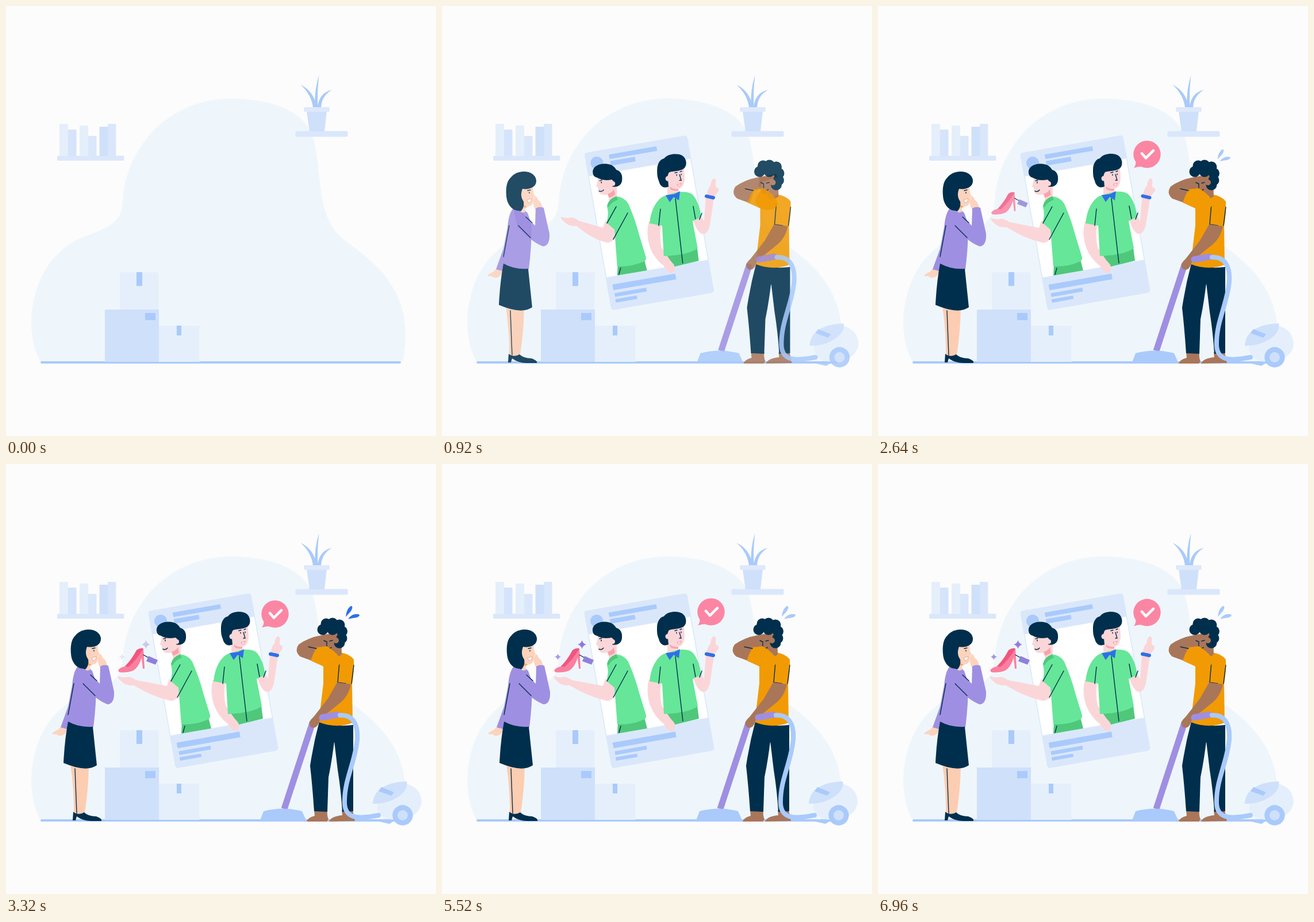
Recreate the animation shown at these times as an HTML page. Size 748 px wide and 748 px high, loop 7000 ms.

```html
<!DOCTYPE html>
<html lang="en">
<head>
<meta charset="utf-8">
<title>Tidy-up scene</title>
<style>
  html, body { margin: 0; width: 100%; height: 100%; overflow: hidden; background: #fcfcfc; }
  svg { display: block; width: 100vw; height: 100vh; }
  .fade > * { opacity: var(--show, 0); }
  .ink { fill: #002f4d; }
  .pink { fill: #fbd6d8; }
  .peach { fill: #fdd3bd; }
  .brown { fill: #a9765a; }
  .green { fill: #66e698; }
  .moss { fill: #4fc87b; }
  .violet { fill: #9f8fe2; }
  .amber { fill: #f19a04; }
  .sky { fill: #a9cafb; }
  .mist { fill: #cfe0fb; }
  .pale { fill: #dae7fb; }
  .haze { fill: #e5effc; }
  .line { fill: none; stroke: #002f4d; stroke-width: 1.4; stroke-linecap: round; }
  .pipe { fill: none; stroke-linecap: round; }
</style>
</head>
<body>
<svg viewBox="0 0 748 748">
  <path fill="#eef6fb" d="M59 618C40 580 41 535 51 500C64 452 95 418 132 403C178 385 201 378 203 340C208 245 283 161 392 161C445 161 520 175 535 232C550 290 540 360 580 400C612 428 695 470 695 572Q695 600 690 618Z"/>

  <g id="books">
    <rect class="pale" x="89" y="260.5" width="116.500" height="8.500" rx="2"/>
    <path class="haze" d="M93 205h15v56h-15zM128 208h15v53h-15z"/>
    <path fill="#d5e4fb" d="M108 215h14.500v46h-14.500z"/>
    <path class="pale" d="M143 226h14.500v35h-14.500zM177 205h14.500v56h-14.500z"/>
    <path class="mist" d="M162.500 210h15v51h-15z"/>
  </g>

  <g id="plant">
    <rect class="pale" x="503.500" y="217.500" width="91" height="10" rx="2"/>
    <path class="sky" d="M534 177Q532 155 512.500 137Q537 149 540 177ZM537.500 177Q536 146 544.500 120Q541 150 542.500 177ZM542 177Q544 151 567 146Q549 156 548 177Z"/>
    <path class="mist" d="M523 183h35l-4 35h-26z"/>
    <rect fill="#dfe9fb" x="518" y="176" width="45" height="8" rx="2"/>
  </g>

  <path class="pipe" stroke="#a9cafb" stroke-width="4" d="M62 620H685"/>
  <g id="boxes">
    <path class="mist" d="M172 528h94v91h-94z"/>
    <path class="haze" d="M198 463h67.500v65h-67.500zM266 556h70.500v63h-70.500z"/>
    <path class="sky" d="M227 463h10v24h-10zM242 534h18v12.500h-18zM297 556h8v17h-8z"/>
  </g>

  <g id="phone">
    <g transform="rotate(-10 360.500 377)">
      <rect class="pale" x="269.500" y="238" width="182" height="278" rx="5"/>
      <path fill="#fff" d="M271 279.500h179v178.500h-179z"/>
      <circle class="sky" cx="288.500" cy="258.700" r="11"/>
      <path class="sky" d="M311.500 248h84v8h-84zM311.500 259.500h44v8h-44zM279 472h111v10h-111zM280 487.500h56v6.500h-56zM279.500 498h38v6h-38z"/>
    </g>

    <g id="presenter">
      <path class="moss" d="M306 449L305 469L357 460L352 441Z"/>
      <path class="pink" d="M271 296L270 307L268 314L271 316Q271 327 278 328Q285 330 290 327L290 338L304 335L304 312L300 296Z"/>
      <path fill="#f9a3aa" d="M288 327Q295 325 299 319L301 328Q296 333 290 333Z"/>
      <path class="ink" d="M262 290C261 279 274 273 288 275C296 276 300 280 303 285C311 287 314 294 313 303C312 312 305 316 296 314Q301 305 295 302Q280 305 270 299Q262 297 262 290Z"/>
      <circle class="pink" cx="297" cy="309" r="4"/>
      <path class="line" d="M277 306v2M274 304l4 -1"/>
      <path class="line" stroke="#e9687a" d="M273 322Q278 324 281 320"/>
      <path id="reach" class="pink"/>
      <path class="green" d="M287 350Q288 337 303 331Q318 333 324 344Q336 371 343 398L355 437Q356 443 350 445Q330 454 305 453L300 389L286 377Q291 362 287 350Z"/>
      <path class="moss" d="M287 348Q289 336 303 331L306 337Q294 341 290 350Z"/>
      <path class="line" d="M303 349L287 378M323 360L298 406M311 456L308 467"/>
    </g>

    <g id="greeter">
      <path class="moss" d="M386 432L390 453L402 454L447 443L444 420Z"/>
      <path class="pink" d="M360 375L381 381Q378 400 382 420L397 442L404 450Q408 462 400 465Q390 462 386 452Q370 440 362 420Q354 396 360 375Z"/>
      <path class="pink" d="M391 286L421 281L422 300Q421 316 411 318L412 326L398 336L392 327Z"/>
      <path fill="#f9a3aa" d="M396 314Q402 319 411 318L411 321Q401 322 397 318Z"/>
      <path class="ink" d="M374 285C374 273 380 266 386 265C392 257 405 256 413 258C425 261 427 275 422 281C416 288 404 286 395 289C392 293 392 298 393 303L394 314C385 318 379 313 377 304C374 297 374 292 374 285Z"/>
      <circle class="pink" cx="393" cy="300" r="4.500"/>
      <path class="line" d="M405 290l4 -1M414 288l3 -1M408 293v1.500M416 292v1.500M413 293l3 10h-3"/>
      <path fill="#fff" stroke="#e9687a" stroke-width=".7" d="M409 310Q413 311 416 308Q416 313 411 313Z"/>
      <g id="wave">
        <path class="pink" d="M437 370L451 366L456 374L459 332L473 334L466 382Q461 399 452 396Q442 391 437 370Z"/>
        <path class="pink" d="M460 330Q462 317 467 312Q468 302 473 299Q478 301 476 310Q475 315 480 316Q483 320 479 324L473 332Z"/>
        <path class="pipe" stroke="#2f6fe8" stroke-width="6" d="M460 330.500L472 333"/>
      </g>
      <path class="green" d="M379 335Q384 330 393 328L412 323Q430 322 436 328Q447 340 451 367L436 374L438 385L445 421Q430 433 386 435L383 382L361 378Q364 349 379 335Z"/>
      <path fill="#2f6fe8" d="M389 329L396 341L403 332L412 338L414 322L404 327Z"/>
      <path class="line" d="M406 335L419 447M380 353L377 382M437 348L441 370M452 360L448 371"/>
    </g>
  </g>

  <g id="bubble">
    <circle fill="#fb86a4" cx="468" cy="257.500" r="23.700"/>
    <path fill="#fb86a4" d="M448 266Q450 275 445 281Q455 278 464 279Z"/>
    <path class="pipe" stroke="#fff" stroke-width="4.500" stroke-linejoin="round" d="M459 256l7 8l13 -13"/>
  </g>

  <g id="shoe">
    <path fill="#fb7f9e" d="M195 359Q198 354 207 352Q219 339 227 324Q233 319 239 321L241 356H238L236 337Q231 353 222 359Q210 364 197 362Z"/>
    <path fill="#f2557f" d="M207 352Q220 339 227 324Q233 319 239 321Q227 341 213 353Z"/>
    <path class="line" d="M239 332L248 337"/>
    <path fill="#8f80da" d="M248 334L264 341L260 349L244 343Z"/>
  </g>
  <path id="sparkBig" fill="#8b79dd"/>
  <path id="sparkSmall" fill="#8b79dd"/>

  <g id="woman" class="fade">
    <g>
      <path class="peach" d="M95 457L106 459Q107 468 98 472Q91 474 88 470L81 470Q79 467 91 462Z"/>
      <path fill="#fdcdb2" d="M112 522L144 527Q143 570 137 606L135 612L118 612Q119 570 112 522Z"/>
      <path class="line" d="M120 530L123 607"/>
      <path class="ink" d="M117 605Q126 612 136 606Q143 613 157 613Q168 617 166 621H148Q134 621 123 613L121 620H116Z"/>
      <path class="violet" d="M124 353Q117 362 115 385L108 422L95 458L106 461L114 436L107 452Q130 461 152 458Q157 420 157 380L150 360Q140 348 124 353Z"/>
      <path class="ink" d="M108 448Q128 459 151 457L158 524Q140 537 100 520Q102 480 108 448Z"/>
      <path class="line" d="M118 382L108 436"/>
      <path class="peach" d="M136 313L159 314L160 325L163 331L160 334Q161 347 151 349L146 348L146 358Q138 362 132 355Z"/>
      <path fill="#f9a673" d="M140 342Q144 348 150 349L146 351Q141 350 139 347Z"/>
      <path class="ink" d="M165 303C164 293 153 287 142 288C131 289 125 293 121 298C113 305 112 318 113 330C114 346 124 357 138 357C143 353 144 345 143 340C138 333 138 326 141 318C151 320 166 316 165 303Z"/>
      <path class="line" d="M150 321l5 -1M153 324v1.500"/>
      <path fill="#fff" stroke="#f08a6a" stroke-width=".7" d="M149 337L157 335Q156 343 151 342Z"/>
    </g>
    <g>
      <g id="hush">
        <path class="peach" d="M164 355Q156 341 163 331Q166 330 168 337Q176 342 176 355Z"/>
        <path class="violet" d="M164 352Q171 348 178 351L188 396Q189 418 176 418Q164 410 163 386Z"/>
      </g>
      <path class="violet" d="M126 356Q138 353 147 366L165 384L180 392Q190 414 177 418Q160 413 132 384Z"/>
      <path class="line" d="M134 382L155 403M147 367L158 377"/>
    </g>
  </g>

  <g id="man" class="fade">
    <g>
      <path class="brown" d="M536 602H559Q558 612 561 618L558 622H523Q525 615 537 612ZM584 602H603L607 621L562 622Q565 613 585 611Z"/>
      <path class="ink" d="M545 448Q572 458 604 454V604L585 605Q583 570 577 532L571 482Q567 516 561 545L559 605L536 604Q533 560 529 525Q535 485 545 448Z"/>
      <path class="line" stroke="#45657c" d="M568 472L571 484"/>
      <path class="amber" d="M558 317Q545 328 543 342L552 352V382L544 449Q575 461 603 450L602 383Q606 360 605 340Q597 330 582 328Q569 338 558 317Z"/>
      <path class="line" d="M580 345L577 380L591 382M605 350L601 382"/>
    </g>
    <path class="brown" d="M534 343L512 335Q501 326 509 314Q526 302 548 298L580 292L582 298L556 306L552 318L541 322Z"/>
    <g>
      <path class="brown" d="M551 297L549 312L552 316Q552 328 564 328L567 335Q577 338 584 331L583 296Z"/>
      <path class="pipe" stroke="#002f4d" stroke-width="19" d="M551 288h0M557 278h0M568 277h0M580 280h0M584.500 291h0M584 303h0M580 311h0M568 288h0"/>
      <circle class="brown" cx="574" cy="307" r="5"/>
      <path class="line" d="M553 307l4 2M563 308l5 -1M558 309v8M557 320Q562 323 566 319"/>
    </g>
    <g>
      <path class="amber" d="M558 317L540 319Q534 330 530 342L552 352Q574 360 582 346Q584 333 558 317Z"/>
      <path class="line" d="M526 318L540 321"/>
    </g>
    <path class="pipe" stroke="#9f8fe2" stroke-width="11" style="stroke-linecap:butt" d="M533.500 449L484 600"/>
    <path class="brown" d="M576 380L600 383Q596 405 578 418L546 444Q542 462 531 458Q523 450 535 440L560 408Z"/>
    <path class="pipe" stroke="#9f8fe2" stroke-width="11" d="M550 441L576 436"/>
    <path class="sky" d="M442 620L448 604Q482 595 515 604L523 622Z"/>
    <path class="haze" d="M645 598Q650 556 695 556Q722 562 723 589Q720 612 690 617Q655 625 645 598Z"/>
    <path class="pipe" stroke="#a9cafb" stroke-width="8" d="M581 437C603 436 613 452 611 480C607 520 588 550 589 590C590 615 608 619 648 611"/>
    <g>
      <path class="mist" d="M638 591Q640 555 697 552Q700 565 685 577Q664 592 638 591Z"/>
      <path class="sky" d="M653 562L675 571L670 577L648 569ZM649 622Q658 614 675 621L667 626Z"/>
      <circle class="sky" cx="690" cy="611" r="17.700"/>
      <circle class="mist" cx="690" cy="611" r="9"/>
    </g>
  </g>

  <path id="sweat" d="M591 266Q592 252 600 247Q605 247 600 256ZM595 269.500Q603 259 614 261.500Q617 264 610 267Z"/>
</svg>
<script>
  const LOOP = 7000, STEP = 40;
  const el = id => document.getElementById(id);
  const clamp = x => Math.max(0, Math.min(1, x));
  const span = (t, from, to) => clamp((t - from) / (to - from));
  const smooth = p => p * p * (3 - 2 * p);
  const mix = (a, b, p) => a + (b - a) * p;
  const cosine = (t, peak, period) => Math.cos(2 * Math.PI * (t - peak) / period);
  const backOut = p => 1 + 2.9 * (p - 1) ** 3 + 1.9 * (p - 1) ** 2;
  const set = (id, name, value) => el(id).setAttribute(name, value);
  const move = (id, value) => set(id, 'transform', value);
  const scaleAt = (x, y, s) => `translate(${x} ${y}) scale(${s}) translate(${-x} ${-y})`;

  function star(x, y, r) {
    const k = r * 0.2;
    return `M${x} ${y - r}Q${x + k} ${y - k} ${x + r} ${y}Q${x + k} ${y + k} ${x} ${y + r}` +
      `Q${x - k} ${y + k} ${x - r} ${y}Q${x - k} ${y - k} ${x} ${y - r}Z`;
  }

  // The open hand slides by d while the elbow stays under the sleeve.
  function reachPath(d) {
    const at = (x, y) => `${x + d} ${y - d * 0.17}`;
    return `M284 374L309 387Q302 411 287 412Q${255 + d / 3} 405 ${at(222, 385)}` +
      `Q${at(207, 386)} ${at(202, 379)}Q${at(193, 372)} ${at(195, 369)}` +
      `Q${at(206, 373)} ${at(213, 370)}Q${at(222, 372)} ${at(226, 376)}L280 386Z`;
  }

  function enter(id, p, distance) {
    el(id).style.setProperty('--show', p);
    move(id, `translate(${distance * (1 - p)} 0)`);
  }

  function draw(t) {
    const left = (1 - span(t, 20, 1020)) ** 3;
    move('phone', `rotate(${180 * left} 340 377.5) ${scaleAt(340, 377.5, 1 - left)}`);

    const shown = span(t, 160, 1040);
    enter('woman', shown, -8);
    enter('man', shown, 11);

    const pull = smooth(span(t, 1360, 2000)), give = smooth(span(t, 2040, 2760));
    set('reach', 'd', reachPath(mix(mix(12, 24, pull), 0, give)));
    move('wave', `rotate(${13 * pull * (1 - give)} 453 364)`);

    const pop = span(t, 1360, 1880);
    const bob = 3.5 * cosine(t, 3320, 3000);
    move('bubble', `translate(0 ${bob}) ${scaleAt(446, 281, pop ? Math.max(0, backOut(pop)) : 0)}`);

    const gift = smooth(span(t, 2320, 2760));
    set('shoe', 'opacity', gift);
    move('shoe', scaleAt(220, 365, mix(0.6, 1, gift)));
    const glow = span(t, 2700, 3200);
    set('sparkBig', 'opacity', glow * clamp(0.7 + 0.35 * cosine(t, 1130, 1500)));
    set('sparkSmall', 'opacity', glow * clamp(0.42 + 0.4 * cosine(t, 870, 1500)));

    const hush = span(t, 2800, 4920);
    move('hush', `rotate(${3 * Math.sin(2 * Math.PI * hush * 2) ** 2} 178 408)`);

    const heat = clamp(cosine(t, 3320, 1500));
    set('sweat', 'fill', `rgb(${mix(169, 47, heat)},${mix(202, 111, heat)},${mix(251, 232, heat)})`);
    move('sweat', scaleAt(588, 276, smooth(span(t, 2040, 2760))));
  }

  set('sparkBig', 'd', star(243.5, 314, 7.5));
  set('sparkSmall', 'd', star(201.5, 335.5, 5.5));

  const start = performance.now();
  function tick() {
    const t = (performance.now() - start) % LOOP;
    draw(Math.floor(t / STEP) * STEP);
    requestAnimationFrame(tick);
  }
  tick();
</script>
</body>
</html>
```
